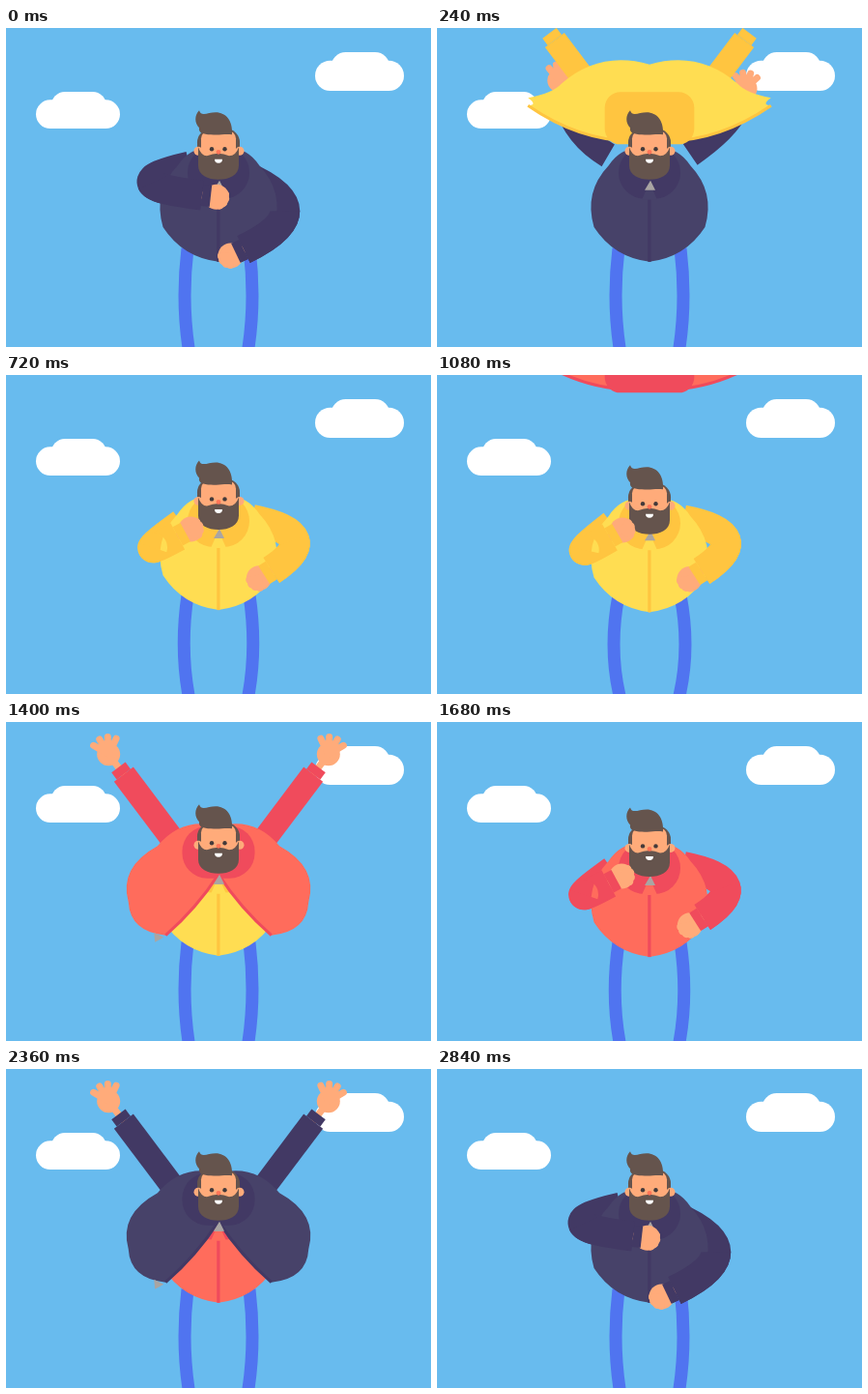
An HTML page with a canvas for the animation above (2880 ms loop, 440 by 330 pixels).

```html
<!DOCTYPE html>
<html lang="en">
<head>
<meta charset="utf-8">
<title>Jackets</title>
<style>
html, body { margin: 0; width: 100%; height: 100%; overflow: hidden; background: #68bbee; }
canvas { display: block; }
</style>
</head>
<body>
<canvas id="stage" width="440" height="330"></canvas>
<script>
const ctx = document.getElementById('stage').getContext('2d');
const CYCLE = 960, LANDED = 290, CLOSED = 720;
const JACKETS = [
  { main: '#474269', dark: '#423964' },
  { main: '#ffdd52', dark: '#ffc540' },
  { main: '#ff6c5c', dark: '#f04b5c' }
];
const SKIN = '#ffab7a', HAIR = '#65544d', ZIP = '#a9a5a3';

const ramp = (t, from, to) => {
  const u = Math.max(0, Math.min(1, (t - from) / (to - from)));
  return u * u * (3 - 2 * u);
};
const pulse = (t, peak, reach) => ramp(t, peak - reach, peak) - ramp(t, peak, peak + reach);
const mix = (a, b, u) => a + (b - a) * u;
const mixPoint = (p, q, u) => p.map((v, i) => mix(v, q[i], u));
const mixArm = (a, b, u) => a.map((p, i) => mixPoint(p, b[i], u));
const sin = degrees => Math.sin(degrees * Math.PI / 180);
const cos = degrees => Math.cos(degrees * Math.PI / 180);

function fill(color, draw) {
  ctx.fillStyle = color;
  ctx.beginPath();
  draw();
  ctx.fill();
}
const disc = (color, x, y, r) => fill(color, () => ctx.arc(x, y, r, 0, 7));
const box = (color, x, y, w, h, r) => fill(color, () => ctx.roundRect(x, y, w, h, r));
const shape = (color, d) => { ctx.fillStyle = color; ctx.fill(new Path2D(d)); };

function line(color, width, draw, cap = 'butt') {
  ctx.strokeStyle = color;
  ctx.lineWidth = width;
  ctx.lineCap = cap;
  ctx.beginPath();
  draw();
  ctx.stroke();
}

function placed(dy, draw, flip = false) {
  ctx.save();
  ctx.translate(flip ? 440 : 0, dy);
  if (flip) ctx.scale(-1, 1);
  draw();
  ctx.restore();
}

function cloud(x, y, w, h) {
  box('#fff', x, y + h * .22, w, h * .78, h * .39);
  box('#fff', x + w * .18, y, w * .66, h * .8, h * .38);
}

// Arms are shoulder, elbow control and cuff, all drawn as left arms; the right one is flipped
const THINK = [[[190, 143], [106, 162], [203, 173]], [[195, 152], [108, 188], [194, 229]]];
const READY = [[[182, 155], [124, 200], [179, 168]], [[185, 150], [107, 165], [166, 203]]];

function raisedArm(angle) {
  const at = r => [176 - r * cos(angle), 126 - r * sin(angle)];
  return [at(0), at(45), at(90)];
}

function armPose(side, t) {
  const ready = ramp(t, 0, 120) - ramp(t, 700, 860);
  const rest = mixArm(THINK[side], READY[side], ready);
  return mixArm(rest, raisedArm(53 - 45 * ramp(t, 440, 640)), lift(t));
}
const lift = t => ramp(t, 120, LANDED) - ramp(t, 540, 740);

function sleeve([shoulder, elbow, cuff], raised, color) {
  const angle = Math.atan2(cuff[1] - elbow[1], cuff[0] - elbow[0]);
  line(color, mix(31, 25, raised), () => {
    ctx.moveTo(...shoulder);
    ctx.quadraticCurveTo(...elbow, ...cuff);
  });
  line(color, mix(22, 18, raised), () => {
    ctx.moveTo(...cuff);
    ctx.lineTo(cuff[0] + 9 * Math.cos(angle), cuff[1] + 9 * Math.sin(angle));
  });
}

function forearm([shoulder, elbow, cuff]) {
  const bend = mixPoint(elbow, cuff, .5);
  return [mixPoint(mixPoint(shoulder, elbow, .5), bend, .5), bend, cuff];
}

function hand([, elbow, cuff], raised) {
  const angle = Math.atan2(cuff[1] - elbow[1], cuff[0] - elbow[0]);
  const reach = 15 + 11 * raised;
  const x = cuff[0] + reach * Math.cos(angle), y = cuff[1] + reach * Math.sin(angle);
  disc(SKIN, x, y, 13 - raised);
  line(SKIN, 7, () => {
    for (let i = 0; i < 4; i++) {
      const a = angle - .4 + i * .5, r = 10 + 8 * raised;
      ctx.moveTo(x, y);
      ctx.lineTo(x + r * Math.cos(a), y + r * Math.sin(a));
    }
    ctx.moveTo(...cuff);
    ctx.lineTo(x, y);
  }, 'round');
}

// A jacket half is a puffy lobe around the throat; swing is the angle of its hem tip from straight down
function jacket(swing, { main, dark }) {
  const polar = (angle, r) => [220 - r * sin(angle), 158 + r * cos(angle)];
  const rim = [
    [180, 32 + .44 * swing],
    [110 + .12 * swing, 45 + .6 * swing],
    [50 + .56 * swing, 75 + .55 * swing],
    [swing, 84 - .3 * swing + .007 * swing * swing]
  ];
  const tip = polar(...rim[3]), edge = [...polar(.8 * swing, rim[3][1] / 2), ...polar(0, 0)];
  for (const flip of [false, true]) placed(0, () => {
    fill(main, () => {
      ctx.moveTo(...polar(...rim[0]));
      for (let i = 1; i < 4; i++) {
        const [a, r] = mixPoint(rim[i - 1], rim[i], .5);
        const puff = i > 1 ? 1 + .16 * sin(2 * swing) : 1;
        ctx.quadraticCurveTo(...polar(a, r * puff / cos(a - rim[i][0])), ...polar(...rim[i]));
      }
      ctx.quadraticCurveTo(...edge);
    });
    line(dark, 3, () => {
      ctx.moveTo(...tip);
      ctx.quadraticCurveTo(...edge);
    });
  }, flip);

  const width = 64 + .27 * swing, bottom = 162 + Math.max(0, 15 - .4 * swing);
  box(dark, 220 - width / 2, bottom - 54, width, 54, 32 - .15 * swing);
  return tip;
}

const zipPull = () => shape(ZIP, 'M221 158L226 168H215Z');

function closedJacket(colors) {
  jacket(0, colors);
  shape(colors.main, 'M220 160L228 178H212Z');
  zipPull();
}

function legs(bulge) {
  for (const flip of [false, true]) placed(0, () => line('#5074f0', 13, () => {
    ctx.moveTo(188, 228);
    ctx.quadraticCurveTo(181 - bulge, 283, 189.5, 334);
  }), flip);
}

function head() {
  box(HAIR, 198, 105, 44, 35, 14);
  box(SKIN, 202, 107, 36, 40, 8);
  for (const x of [199, 242]) disc(SKIN, x, 128, 4.5);
  shape(HAIR, 'M199 124Q202 133 208 133Q220 128 231 133Q238 133 241 124V143C241 153 231 157.500 220 157.500C209 157.500 199 153 199 143Z');
  shape(HAIR, 'M200 86C202 93 209 88 217 88C228 88 235 97 234 111C225 110 222 112 212 111C204 111 199 109 200 104C195 99 195 91 200 86Z');
  for (const x of [213, 226.5]) disc('#443a3a', x, 126, 2.2);
  disc('#ff7558', 220, 129, 2.4);
  fill('#fff', () => ctx.arc(220, 136.5, 4, 0, Math.PI));
}

function draw(time) {
  const t = time % CYCLE, turn = Math.floor(time / CYCLE);
  const worn = JACKETS[turn % 3], next = JACKETS[(turn + 1) % 3];
  const dip = 8 * pulse(t, 120, 120) + 3 * pulse(t, 350, 70) + 4 * pulse(t, 690, 100) - .7;
  const bodyDip = dip * .45;
  const fall = Math.min(0, (t - LANDED) * .85);
  const swing = 106 - 65 * ramp(t, LANDED, 400) - 41 * ramp(t, 490, CLOSED);
  const dressed = t >= LANDED, armsDown = t < 180 || t > 620;
  const raised = lift(t), armColor = (dressed ? next : worn).dark;
  const eachArm = action => [0, 1].forEach(side => placed(0, () => action(armPose(side, t)), side === 1));

  ctx.fillStyle = '#68bbee';
  ctx.fillRect(0, 0, 440, 330);
  cloud(31, 66, 87, 38);
  cloud(320, 25, 92, 40);
  legs(dip * .5);

  eachArm(arm => {
    if (!armsDown) hand(arm, raised);
    sleeve(arm, raised, armColor);
  });
  if (!dressed) for (const flip of [false, true]) {
    placed(fall, () => sleeve(raisedArm(53), 1, next.dark), flip);
  }

  placed(bodyDip, () => closedJacket(t < CLOSED - 20 ? worn : next));
  if (t < CLOSED) placed(dressed ? bodyDip : fall, () => {
    const [x, y] = jacket(swing, next);
    if (t > 370 && t < 600) {
      shape(ZIP, `M${x - 12} ${y - 3}l10 5l-9 5Z`);
      zipPull();
    }
  });

  placed(dip, head);
  if (armsDown) eachArm(arm => {
    hand(arm, raised);
    sleeve(forearm(arm), raised, armColor);
  });
}

const start = performance.now();
function frame() {
  draw((performance.now() - start) % (3 * CYCLE));
  requestAnimationFrame(frame);
}
frame();
</script>
</body>
</html>
```
